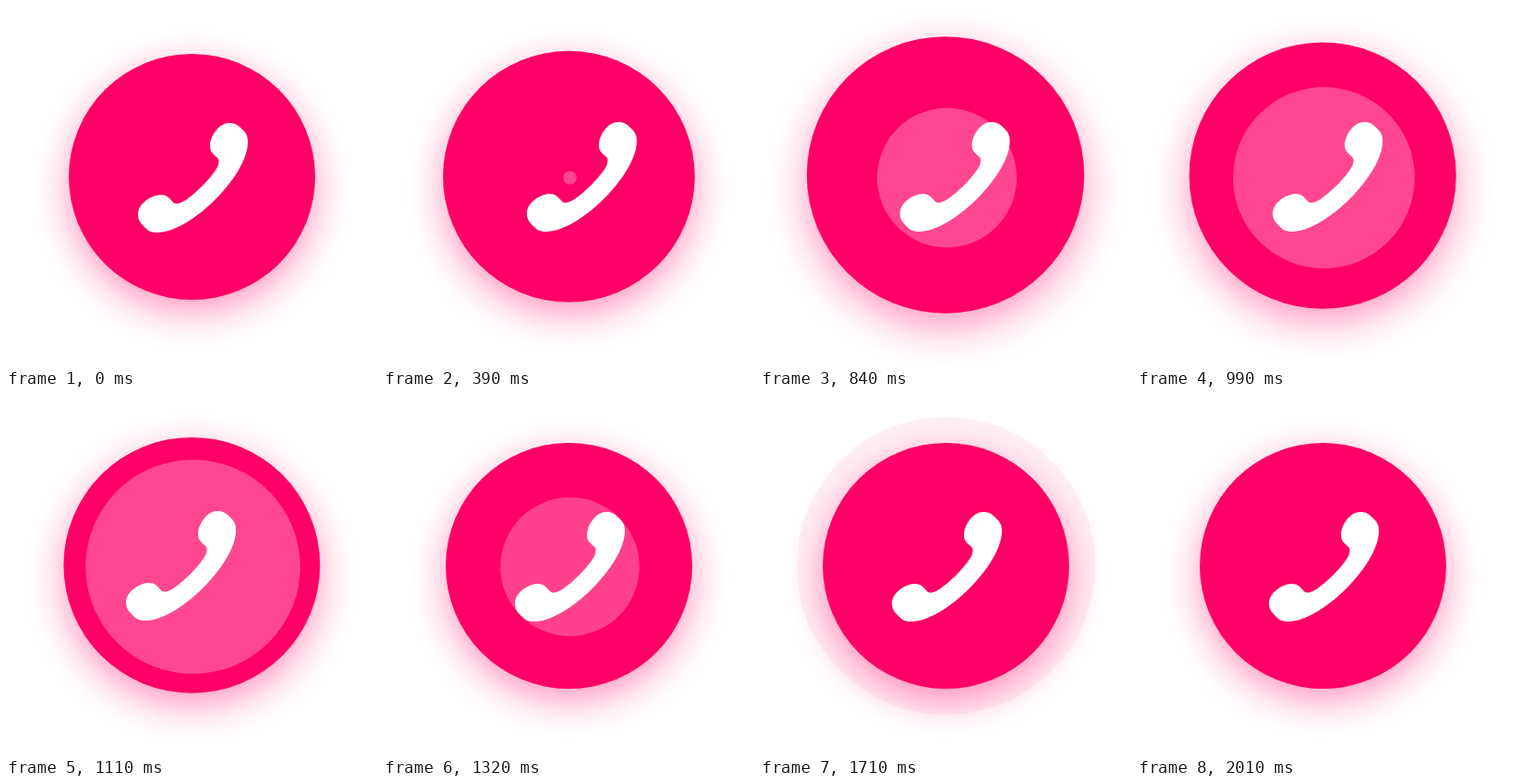
Recreate the animation shown at these times as an HTML page with a canvas. Size 402 px wide and 392 px high, loop 2400 ms.

```html
<!DOCTYPE html>
<html lang="en">
<head>
<meta charset="utf-8">
<title>Ringing phone button</title>
<style>
  html, body { margin: 0; width: 100%; height: 100%; overflow: hidden; background: #fff; }
  canvas { display: block; }
</style>
</head>
<body>
<canvas width="402" height="392"></canvas>
<script>
const ctx = document.querySelector('canvas').getContext('2d');
const LOOP = 2400;
const RADIUS = 133.5;
const PINK = '255, 0, 102';

// Symmetric about the diagonal running through the middle of the handle.
const handset = new Path2D(`
  M242 127
  C248 127 251 129 255 133
  C260 138 262 140 262 148
  C262 184 200 246 164 246
  C156 246 154 244 149 239
  C145 235 143 232 143 226
  C143 215 157 205 168 205
  C175 205 177 209 180 212
  C182 215 185 215 188 214
  C198 212 229 181 230 172
  C231 169 231 166 228 164
  C225 161 221 159 221 152
  C221 141 231 127 242 127 Z`);

// Linear interpolation through [time, value] keys, held at both ends.
function track(t, keys) {
  if (t <= keys[0][0]) return keys[0][1];
  for (let i = 1; i < keys.length; i++) {
    const [t0, v0] = keys[i - 1];
    const [t1, v1] = keys[i];
    if (t <= t1) return v0 + (v1 - v0) * (t - t0) / (t1 - t0);
  }
  return keys[keys.length - 1][1];
}

function disc(x, y, r, color) {
  ctx.fillStyle = color;
  ctx.beginPath();
  ctx.arc(x, y, Math.max(r, 0), 0, Math.PI * 2);
  ctx.fill();
}

function drawButton(scale) {
  ctx.save();
  ctx.shadowColor = `rgba(${PINK}, 0.42)`;
  ctx.shadowBlur = 40 * scale;
  ctx.shadowOffsetY = 13 * scale;
  const grown = scale - 1;
  disc(201.5 - 4 * grown, 185.5 - 16 * grown, RADIUS * scale, `rgb(${PINK})`);
  ctx.restore();
}

function drawRing(t) {
  if (t < 1320 || t >= 2010) return;
  const r = track(t, [[1363, RADIUS], [1770, 166.5]]);
  const alpha = track(t, [[1320, 0.27], [1530, 0.15], [1770, 0.03]]);
  disc(201.5, 185.5, r, `rgba(${PINK}, ${alpha})`);
}

function drawPulse(t) {
  const r = track(t, [[343, 0], [1110, 116.5], [1707, 0]]);
  const alpha = track(t, [[1290, 0.28], [1661, 0]]);
  disc(202.5, 186.5, r, `rgba(255, 255, 255, ${alpha})`);
}

function drawPhone(t) {
  const shake = track(t, [[300, 0], [420, 17], [660, -17], [900, 17], [1140, -17], [1260, 0]]);
  const lift = t >= 210 && t < 1260 ? -1 : 0;
  ctx.save();
  ctx.translate(shake, lift);
  ctx.fillStyle = '#fff';
  ctx.fill(handset);
  ctx.restore();
}

function draw(t) {
  ctx.fillStyle = '#fff';
  ctx.fillRect(0, 0, 402, 392);
  drawRing(t);
  drawButton(track(t, [[297, 1], [860, 1.13], [1225, 1]]));
  drawPulse(t);
  drawPhone(t);
}

const start = performance.now();
function frame() {
  draw((performance.now() - start) % LOOP);
  requestAnimationFrame(frame);
}
frame();
</script>
</body>
</html>
```
